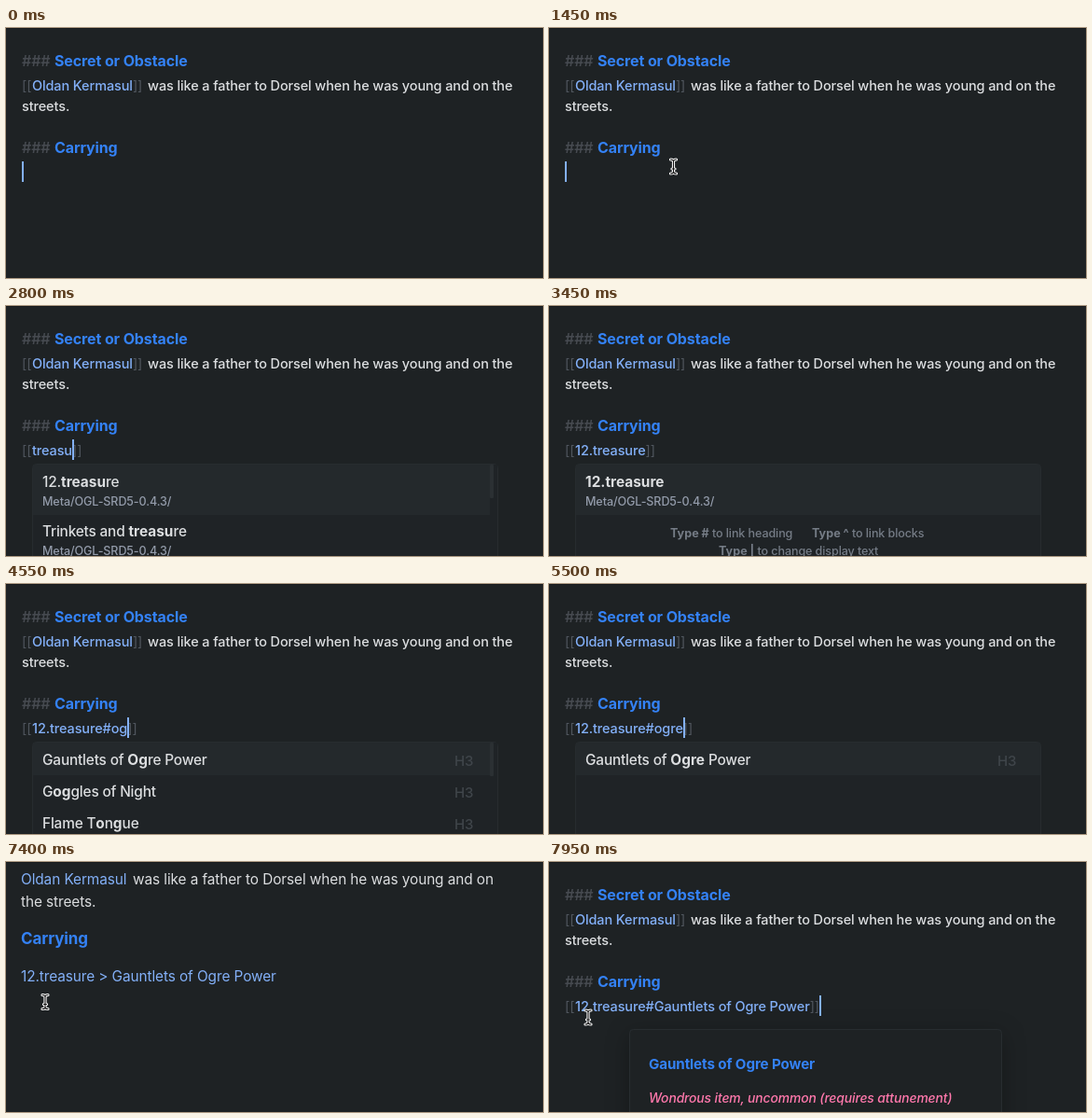
Animation, 576 px wide and 268 px high, one loop 8000 ms. Source, as an HTML page:

```html
<!DOCTYPE html>
<html lang="en">
<head>
<meta charset="utf-8">
<title>Linking a heading</title>
<style>
  html, body { margin: 0; width: 100%; height: 100%; overflow: hidden; background: #1e2224; }
  svg { display: block; width: 576px; height: 268px; }
  text { font: 500 14.5px Inter, sans-serif; letter-spacing: -.12px; fill: #dcdee0; white-space: pre; }
  .big { font-size: 15.4px; letter-spacing: -.18px; }
  .read { font-size: 15.4px; font-weight: 400; letter-spacing: -.1px; }
  .head { font-size: 16px; font-weight: 700; fill: #3482f6; }
  .hash { font-size: 16px; font-weight: 600; fill: #464a50; }
  .link { fill: #83b0f8; }
  .mark { fill: #50565e; font-weight: 400; }
  .path { font-size: 12.6px; fill: #939baa; }
  .hint { font-size: 12.6px; fill: #757c86; }
  .level { font-size: 15px; fill: #3f454a; }
  .note { font-size: 13.9px; font-style: italic; fill: #ff78ac; }
  .b { font-weight: 700; letter-spacing: 0; }
  #card { filter: drop-shadow(0 6px 12px rgb(0 0 0 / .3)); }
</style>
</head>
<body>
<svg viewBox="0 0 576 268">
  <defs>
    <path id="stem" d="M-3-7.5Q0-7.5 0-5.5Q0-7.5 3-7.5M0-5.5V5.5M-3 7.5Q0 7.5 0 5.5Q0 7.5 3 7.5M-1.5 2.5H1.5"/>
  </defs>
  <rect width="576" height="268" fill="#1e2224"/>
  <rect width="576" height="1" fill="#181b1d"/>

  <g id="editor">
    <text class="hash" x="17" y="41">###</text>
    <text class="head" x="52" y="41">Secret or Obstacle</text>
    <text x="17" y="67"><tspan class="mark">[[</tspan><tspan class="link" x="28">Oldan Kermasul</tspan><tspan class="mark">]]</tspan></text>
    <text x="152" y="67">was like a father to Dorsel when he was young and on the</text>
    <text x="17" y="89">streets.</text>
    <text class="hash" x="17" y="134">###</text>
    <text class="head" x="52" y="134">Carrying</text>
    <text y="160"><tspan id="open" class="mark" x="17"></tspan><tspan id="typed" class="link" x="28"></tspan><tspan id="close" class="mark"></tspan></text>
    <rect id="caret" y="143" width="2" height="22" fill="#83b0f8"/>
    <g id="list"></g>
    <g id="popover">
      <rect id="card" x="86.5" y="179.5" width="399" height="120" rx="4" fill="#1e2224" stroke="#282d30"/>
      <text class="head" style="font-size:15.2px" x="107" y="222">Gauntlets of Ogre Power</text>
      <text class="note" x="107" y="258">Wondrous item, uncommon (requires attunement)</text>
    </g>
  </g>

  <g id="preview">
    <text class="read link" x="16" y="24">Oldan Kermasul</text>
    <text class="read" x="136" y="24">was like a father to Dorsel when he was young and on</text>
    <text class="read" x="16" y="48">the streets.</text>
    <text class="head" style="font-size:17px" x="16" y="88">Carrying</text>
    <text id="target" class="read link" x="16" y="128">12.treasure &gt; Gauntlets of Ogre Power</text>
  </g>

  <g id="beam" fill="none" stroke-linecap="round">
    <use href="#stem" stroke="#fff" stroke-width="3.2"/>
    <use href="#stem" stroke="#111" stroke-width="1.1"/>
  </g>
  <path id="arrow" d="M0 0V14.5L3.4 11.4L5.8 17L8.3 16L5.9 10.5H10.4Z" fill="#111" stroke="#fff" stroke-width="1.2"/>
  <path id="hand" d="M-1.5 1Q0-1 1.5 1V7Q4 5.5 5 7.5Q8 6.5 8.5 9V13L6.5 17H-1.5L-6 10.5Q-5 8-1.5 11Z" fill="#fff" stroke="#111"/>
</svg>
<script>
const LOOP = 8000;
const $ = id => document.getElementById(id);
const show = (id, on) => $(id).setAttribute('visibility', on ? 'visible' : 'hidden');
const place = (id, [x, y]) => $(id).setAttribute('transform', `translate(${x} ${y})`);

// Asterisks surround the matched letters.
const rich = s => s.replace(/\*(.+?)\*/g, '<tspan class="b">$1</tspan>');
const label = (x, y, cls, s) => `<text class="${cls}" x="${x}" y="${y}">${rich(s)}</text>`;
const panel = rowHeight => `
  <rect x="28.5" y="169.5" width="499" height="110" rx="4" fill="#1f2326" stroke="#272c2f"/>
  <rect x="29" y="170" width="498" height="${rowHeight}" fill="#24292c"/>`;
const scrollbar = '<rect x="519" y="170" width="8" height="98" fill="#1f2326"/><rect x="519" y="170" width="4" height="36" rx="1" fill="#2b3033"/>';

const files = (...items) => panel(54) + scrollbar + items.map(([name, path], i) =>
  label(39, 194 + i * 53, 'big', name) + label(39, 214 + i * 53, 'path', path)).join('');
const headings = (...items) => panel(35) + (items.length > 1 ? scrollbar : '') + items.map((name, i) =>
  label(39, 194 + i * 34, 'big', name) + label(481, 195 + i * 34, 'level', 'H3')).join('');

const RULES = 'Meta/OGL-SRD5-0.4.3/';
const people = (a, b) => files([a, 'Life/NPCs/'], [b, 'Life/NPCs/']);
const matches = s => {
  const word = 'treasure'.replace(s, `*${s}*`);
  return files([`12.${word}`, RULES], [`Trinkets and ${word}`, RULES]);
};
const chosen = panel(54) + label(39, 194, 'big', '*12.treasure*') + label(39, 214, 'path', RULES)
  + label(130, 248, 'hint', '*Type #* to link heading') + label(282, 248, 'hint', '*Type ^* to link blocks')
  + label(182, 267, 'hint', '*Type |* to change display text');

// time, open brackets, typed text, list
const steps = [
  [0, '', '', ''],
  [2000, '[', '', ''],
  [2100, '[[', '', people('Turvo', 'Tilna')],
  [2450, '[[', 't', people('*T*urvo', '*T*ilna')],
  [2550, '[[', 'tr', people('*T*urvo', '*T*ilna')],
  ...[2600, 2650, 2750, 2800, 2850, 2950].map((time, i) => {
    const word = 'treasure'.slice(0, i + 3);
    return [time, '[[', word, matches(word)];
  }),
  [3100, '[[', '12.treasure', chosen],
  [3600, '[[', '12.treasure#', headings('Adamantine Armor', 'Ammunition', 'Amulet of Health')],
  [4450, '[[', '12.treasure#o', headings('Adamantine Arm*o*r', 'Ammuniti*o*n', 'Amulet *o*f Health')],
  [4550, '[[', '12.treasure#og', headings('Gauntlets of *Og*re Power', 'G*og*gles of Night', 'Flame T*o*n*g*ue')],
  [4650, '[[', '12.treasure#ogr', headings('Gauntlets of *Ogr*e Power')],
  [5300, '[[', '12.treasure#ogre', headings('Gauntlets of *Ogre* Power')],
  [5550, '[[', '12.treasure#Gauntlets of Ogre Power', '']
];
const caretOff = [[150, 400], [650, 950], [1200, 1450], [1750, 2000], [2400, 2450],
  [3350, 3600], [3850, 4100], [4400, 4450], [4900, 5200], [5900, 6150]];

const ease = p => p * p * (3 - 2 * p);
const progress = (t, from, to) => Math.min(1, Math.max(0, (t - from) / (to - from)));
const between = (a, b, p) => a.map((v, i) => v + (b[i] - v) * ease(p));

let current;
function setStep(step) {
  if (step === current) return;
  current = step;
  const [time, open, typed, list] = step;
  $('open').textContent = open;
  $('typed').textContent = typed;
  $('close').textContent = open.replace(/\[/g, ']');
  $('list').innerHTML = list;
  const inside = 17 + $('open').getComputedTextLength();
  const end = typed ? 28 + $('typed').getComputedTextLength() : inside;
  const after = time >= 5550 ? $('close').getComputedTextLength() : 0;
  $('caret').setAttribute('x', Math.round(end + after));
}

function pointer(t) {
  if (t < 50) return [];
  if (t < 150) return ['beam', [324, 38]];
  if (t < 2000) return ['beam', between([208, 149], [133.5, 148.5], progress(t, 250, 500))];
  if (t < 6450) return [];
  if (t < 7400) return [t < 7050 ? 'arrow' : 'hand', between([146, 186.5], [42, 122], progress(t, 6780, 7150))];
  return ['beam', between([42, 150], [42, 166.5], progress(t, 7400, 7450))];
}

function render(t) {
  const reading = t >= 6450 && t < 7700;
  setStep(steps.findLast(step => step[0] <= t));
  $('editor').style.display = reading ? 'none' : '';
  $('preview').style.display = reading ? '' : 'none';
  show('caret', !caretOff.some(([from, to]) => t >= from && t < to));
  $('popover').style.opacity = progress(t, 7780, 7930);
  $('target').style.fill = t >= 7050 && t < 7400 ? '#a9c9ff' : '';
  const [shape, at] = pointer(t);
  for (const id of ['beam', 'arrow', 'hand']) show(id, id === shape);
  if (shape) place(shape, at);
}

const start = performance.now();
function tick() {
  render((performance.now() - start) % LOOP);
  requestAnimationFrame(tick);
}
tick();
</script>
</body>
</html>
```
